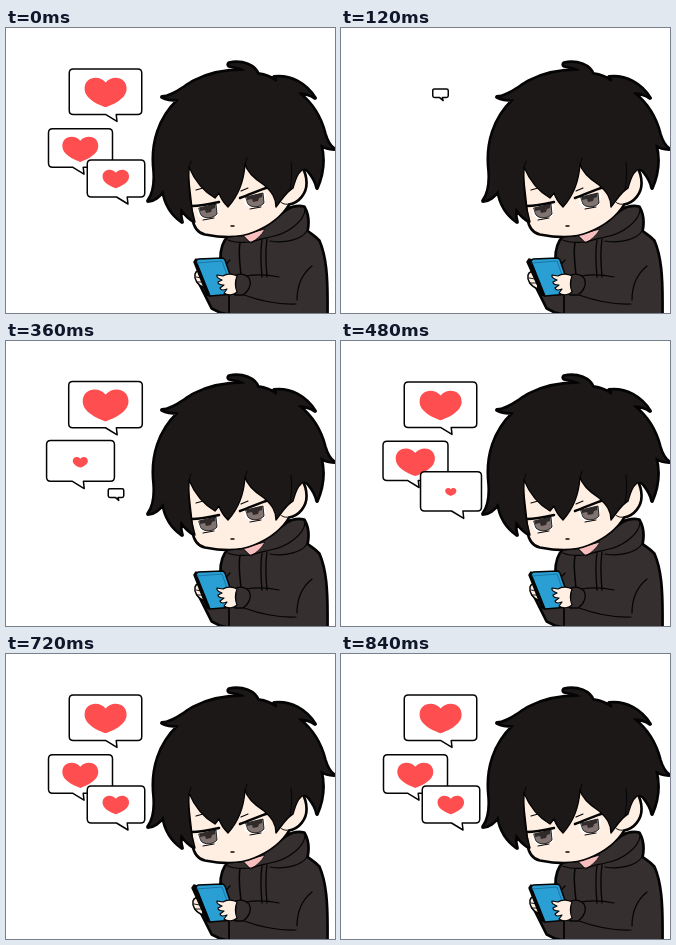
An HTML page with a canvas for the animation above (960 ms loop, 329 px wide and 285 px high).

```html
<!DOCTYPE html>
<html lang="en">
<head>
<meta charset="utf-8">
<title>Message hearts</title>
<style>
html, body { margin: 0; width: 100%; height: 100%; overflow: hidden; background: #fff; }
canvas { display: block; width: 329px; height: 285px; }
</style>
</head>
<body>
<canvas id="stage"></canvas>
<script>
const W = 329, H = 285, STEP = 120, STEPS = 8;
const canvas = document.getElementById('stage');
const ctx = canvas.getContext('2d');
const ratio = window.devicePixelRatio || 1;
canvas.width = Math.round(W * ratio);
canvas.height = Math.round(H * ratio);

const INK = '#050404', HAIR = '#1c1818', CLOTH = '#352f2f', SKIN = '#ffeee2', RED = '#ff4e50';

const hoodie = 'M222 209 C215 216 214 230 216 243 L194 256 C198 264 202 272 206 280 L214 284 L223 286 ' +
  'L321 286 L321 274 C321 250 320 229 313 213 C309 208 304 206 301 203 C303 194 302 186 298 179 ' +
  'C293 178 286 179 281 182 L248 206 Z';
const face = 'M181 136 L187 190 C188 198 191 204 199 206 C214 209 234 210 248 204 ' +
  'C263 198 276 188 283 176 C293 174 300 165 300 155 C300 148 298 143 295 138 Z';
const hair = 'M156 69 C168 68 177 59 188 53 C203 45 221 42 238 42 C233 39 228 39 223 38 ' +
  'C222 37 222 36 223 35 C237 32 249 38 252 46 C259 47 265 49 270 53 ' +
  'C272 50 269 50 268 49 C285 47 300 56 309 70 C304 66 299 65 293 65 ' +
  'C307 76 315 90 319 106 C321 113 324 118 328 121 C323 121 319 120 315 117 ' +
  'C319 132 317 146 311 160 C310 154 307 149 303 144 C301 141 297 140 294 144 ' +
  'C290 148 289 154 287 160 C281 163 277 170 270 179 C270 170 266 164 258 157 ' +
  'C249 151 241 144 239 136 C238 151 233 167 222 179 C218 175 215 171 213 165 L209 170 ' +
  'C197 163 188 151 183 139 C182 155 184 177 189 194 C183 191 179 187 175 181 ' +
  'C174 187 175 191 176 194 C166 187 159 176 157 163 C154 168 148 173 142 173 ' +
  'C148 165 149 154 148 142 C145 115 153 90 172 72 C166 72 160 71 156 69 Z';

function shape(d, fill, stroke = INK, width = 1.3) {
  const p = new Path2D(d);
  if (fill) { ctx.fillStyle = fill; ctx.fill(p); }
  if (stroke) { ctx.strokeStyle = stroke; ctx.lineWidth = width; ctx.stroke(p); }
}
const line = (d, width = 1.2, color = INK) => shape(d, null, color, width);

function drawHoodie() {
  shape(hoodie, CLOTH, INK, 1.6);
  shape('M237 207 L259 201 C256 207 250 212 245 215 Z', '#f6bfbd', INK, .8);
  line('M299 182 C298 193 282 206 264 209 C256 211 250 212 246 214');
  line('M222 212 C230 216 239 214 246 214');
  line('M301 203 C296 211 279 216 264 213');
  line('M234 215 C232 224 234 236 235 247', 1.5);
  line('M256 212 C254 224 255 238 256 249', 1.3);
  line('M261 211 C259 224 260 238 261 249', 1.3);
  line('M306 238 C296 246 291 257 291 272');
  line('M240 248 C251 246 264 247 273 249');
  line('M238 267 C252 272 270 277 290 276');
  line('M216 243 C218 238 221 235 224 232');
  line('M223 268 L223 285', 1.8);
}

function drawEye(x, y) {
  ctx.save();
  ctx.translate(x, y);
  shape('M-10 3 L12 -2 L11 9 C6 14 -4 14 -9 10 Z', '#fff', null);
  shape('M-8 2 L9 -2 L10 8 C6 13 -3 13 -6 9 Z', '#81736f', INK, .8);
  shape('M-7 2 L8 -2 L8 2 L5 3 L4 6 L-1 7 L-2 4 L-7 5 Z', '#302a2b', null);
  line('M-4 14 L7 12', 1);
  ctx.restore();
}

function drawFace() {
  shape(face, SKIN, INK, 1.5);
  line('M283 176 C278 177 275 175 273 172', 1);
  drawEye(201, 178);
  drawEye(248, 167);
  line('M186 178 C194 178 204 176 213 174', 2.5);
  line('M234 170 C243 167 253 162 263 159', 2.5);
  line('M190 162 L197 160', 1.1);
  line('M235 163 L242 160', 1.1);
  line('M225 198 L228 198', 1.3);
}

function drawLocks() {
  line('M285 134 C286 143 286 152 284 162', 1);
  line('M183 140 L185 133', 1);
  line('M239 137 L241 130', 1);
}

function drawPhone(tilted) {
  const dx = tilted ? -2 : 0;
  ctx.save();
  ctx.translate(dx, dx ? 1 : 0);
  shape('M198 244 C193 241 190 243 189 246 C188 251 191 257 199 260 Z', SKIN, INK, 1.5);
  line('M190 249 L196 250', .9);
  line('M191 254 L197 254', .9);
  ctx.restore();

  const edge = 188 + dx;
  shape(`M${edge} 234 L${edge + 2} 231 L191 232 L204 268 L201 267 Z`, INK, INK, 1.5);
  shape('M190 233 L192 231 L217 230 L219 232 L230 264 L228 266 L204 268 Z', '#2a9fd4', INK, 1.5);
  line('M191 235 L216 233 L227 264', .8, '#176d98');

  shape('M230 247 C235 245 240 247 243 250 C246 256 243 263 237 267 L229 267 Z', CLOTH, INK, 1.3);
  shape('M231 248 C226 245 220 246 217 248 L211 247 C210 249 213 251 216 252 L212 254 ' +
    'C212 257 215 257 218 257 L214 260 C215 263 218 262 221 261 L218 265 ' +
    'C222 268 228 267 231 264 C229 259 229 253 231 248 Z', SKIN, INK, 1.2);
}

function drawPerson(tilted) {
  // Heavy contour around the whole figure
  [hoodie, face, hair].forEach(d => line(d, 3.8));
  drawHoodie();
  drawFace();
  shape(hair, HAIR, INK, 1.4);
  drawLocks();
  drawPhone(tilted);
}

// Each bubble: centre, size, tail tip offset, heart, first step
const bubbles = [
  { x: 99.5, y: 63.7, w: 72.5, h: 45.5, tail: 11.5, heart: [99.6, 64.5, 42], start: 1 },
  { x: 74.5, y: 119.9, w: 64, h: 38.5, tail: 3.5, heart: [74.3, 121.3, 36], start: 2 },
  { x: 110, y: 150.5, w: 57.5, h: 37, tail: 12, heart: [109.8, 151, 26.5], start: 3 }
];
const boxScale = [.23, 1.06, 1.015, 1];
const heartScale = [0, .42, 1.09, 1];

function drawBox(b, s) {
  const small = s < .5;
  const w = small ? 15.5 : b.w * s, h = small ? 8.7 : b.h * s, r = Math.min(4, h / 5);
  const cy = b.y + 2 * (1 - s);
  const l = b.x - w / 2, t = cy - h / 2, rt = l + w, bt = t + h;
  const tip = b.x + b.tail * s, root = Math.max(3.5, 11.5 * s);
  shape(`M${l + r} ${t} H${rt - r} Q${rt} ${t} ${rt} ${t + r} V${bt - r} Q${rt} ${bt} ${rt - r} ${bt} ` +
    `H${tip - .8} L${tip} ${bt + Math.max(3, 7 * s)} L${tip - root} ${bt} ` +
    `H${l + r} Q${l} ${bt} ${l} ${bt - r} V${t + r} Q${l} ${t} ${l + r} ${t} Z`, '#fff', INK, 1.5);
}

function drawHeart([x, y, w], s) {
  ctx.save();
  ctx.translate(x, y);
  ctx.scale(w * s, w * s * .7);
  shape('M0 .5 C-.2 .4 -.5 .2 -.5 -.13 C-.5 -.56 -.14 -.6 0 -.34 ' +
    'C.14 -.6 .5 -.56 .5 -.13 C.5 .2 .2 .4 0 .5 Z', RED, null);
  ctx.restore();
}

function drawBubble(b, step) {
  const k = step === 0 ? 3 : Math.min(3, step - b.start);
  if (k < 0) return;
  drawBox(b, boxScale[k]);
  if (k > 0) drawHeart(b.heart, heartScale[k]);
}

function render(now) {
  const step = Math.floor(now / STEP) % STEPS;
  ctx.setTransform(ratio, 0, 0, ratio, 0, 0);
  ctx.fillStyle = '#fff';
  ctx.fillRect(0, 0, W, H);
  ctx.lineJoin = ctx.lineCap = 'round';
  drawPerson(step % 4 === 1 || step % 4 === 2);
  bubbles.forEach(b => drawBubble(b, step));
}

const begin = performance.now();
function tick() {
  render(performance.now() - begin);
  requestAnimationFrame(tick);
}
tick();
</script>
</body>
</html>
```
